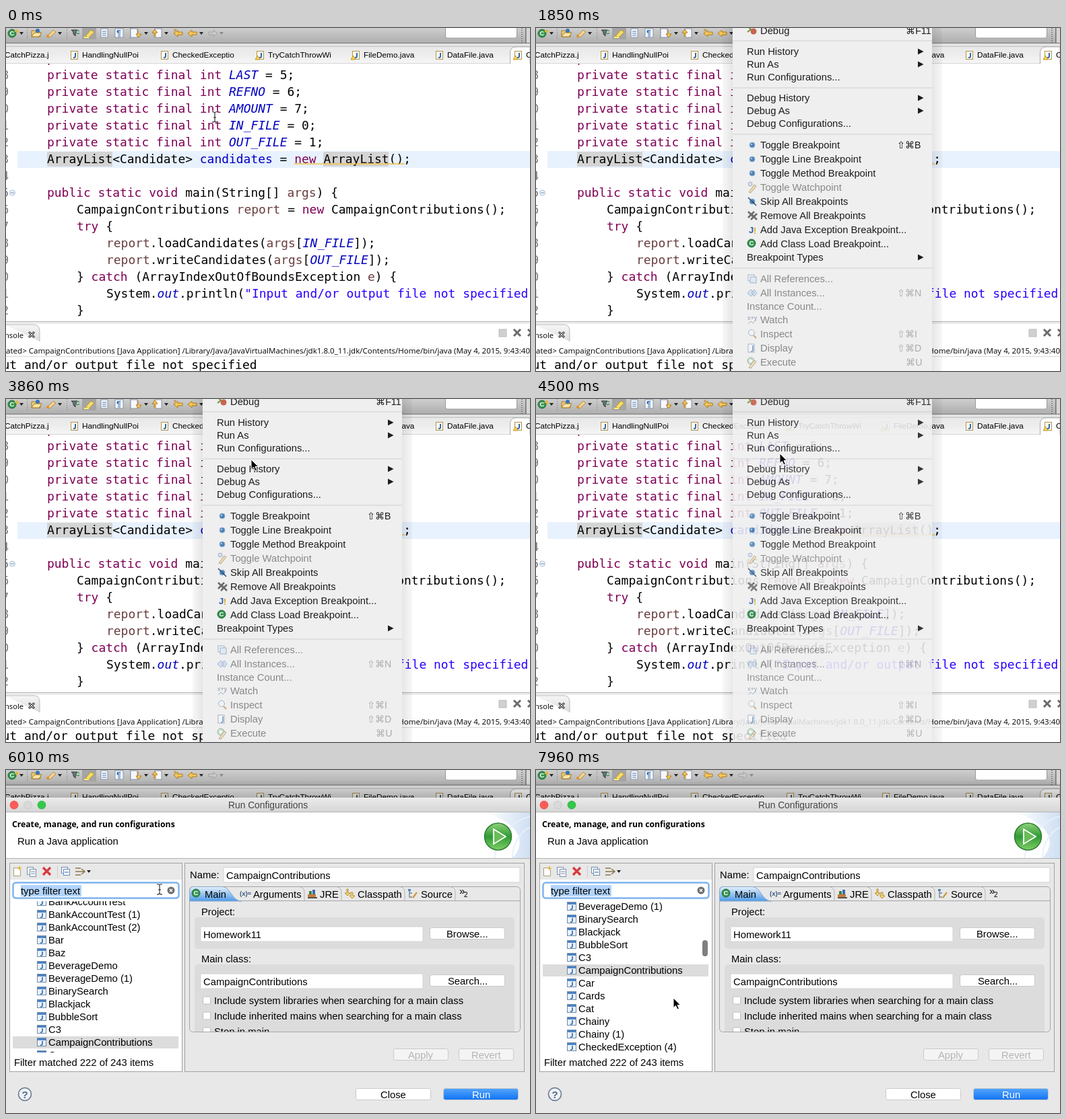
Write an HTML page that moves like this. It is 778 by 510 pixels and loops after 8 s.

```html
<!DOCTYPE html>
<html lang="en">
<head>
<meta charset="utf-8">
<title>Run configurations</title>
<style>
html, body { margin: 0; width: 100%; height: 100%; overflow: hidden; background: #fff; }
svg { display: block; width: 778px; height: 510px; font-family: "Liberation Sans", Arial, "DejaVu Sans", sans-serif; }
text { white-space: pre; }
.mono { font-family: "DejaVu Sans Mono", monospace; }
.human { font-family: "Open Sans", "Noto Sans", sans-serif; }
</style>
</head>
<body>
<svg id="stage" viewBox="0 0 778 510"></svg>
<script>
const LOOP = 8000;
const stage = document.getElementById('stage');

// Drawing helpers
const esc = s => s.replace(/&/g, '&amp;').replace(/</g, '&lt;');
const text = (x, y, s, size = 14.8, fill = '#000', extra = '') =>
  `<text x="${x}" y="${y}" font-size="${size}" fill="${fill}" ${extra}>${esc(s)}</text>`;
const rect = (x, y, w, h, fill, extra = '') =>
  `<rect x="${x}" y="${y}" width="${w}" height="${h}" fill="${fill}" ${extra}/>`;
const disc = (x, y, r, fill, extra = '') => `<circle cx="${x}" cy="${y}" r="${r}" fill="${fill}" ${extra}/>`;
const path = (d, stroke, width = 1, fill = 'none', extra = '') =>
  `<path d="${d}" stroke="${stroke}" stroke-width="${width}" fill="${fill}" ${extra}/>`;
const fillPath = (d, fill) => path(d, 'none', 0, fill);
const group = (id, body) => `<g id="${id}">${body}</g>`;
const clip = (id, x, y, w, h) => `<clipPath id="${id}">${rect(x, y, w, h, '#000')}</clipPath>`;
const gradient = (id, stops, across = false) =>
  `<linearGradient id="${id}" x2="${across ? 1 : 0}" y2="${across ? 0 : 1}">` +
  stops.map(([color, alpha = 1], i) =>
    `<stop offset="${i / (stops.length - 1)}" stop-color="${color}" stop-opacity="${alpha}"/>`).join('') +
  '</linearGradient>';
const down = (x, y, fill = '#222') => fillPath(`M${x - 3} ${y - 2}h6l-3 4z`, fill);
const greenC = (x, y, r) => disc(x, y, r, '#35934f', 'stroke="#1f6b38"') +
  text(x - r * .6, y + r * .58, 'C', r * 1.6, '#fff', 'font-weight="bold"');

const defs = '<defs>' +
  gradient('bar', [['#cecece'], ['#aeaeae']]) +
  gradient('strip', [['#e8e8e8'], ['#ededed'], ['#f6f6f6']]) +
  gradient('consoleStrip', [['#f6f6f6'], ['#dcdcdc']]) +
  gradient('title', [['#ebebeb'], ['#d5d5d5']]) +
  gradient('activeTab', [['#e4f0fc'], ['#4f9be8']]) +
  gradient('blue', [['#56a6fa'], ['#0f72f5']]) +
  gradient('orb', [['#8fd37b'], ['#2f9a35'], ['#7fd063']]) +
  gradient('sheetShade', [['#000', 0], ['#000', .26]]) +
  gradient('shadeL', [['#000', .03], ['#000', .1]], true) +
  gradient('shadeR', [['#000', .1], ['#000', .03]], true) +
  gradient('banner', [['#ffffff'], ['#cfdff3']], true) +
  clip('editor', 0, 53, 778, 383) + clip('list', 10, 195, 246, 225) + clip('form', 272, 195, 483, 194) +
  '</defs>';

// Editor window
function toolbar() {
  const arrow = (x, dir, fill = '#f3c75a', edge = '#b07c1c') =>
    path(`M${x - 7 * dir} 8l${6 * dir}-5v3h${7 * dir}v4h${-7 * dir}v3z`, edge, 1, fill);
  const page = x => rect(x - 5, 1, 10, 13, '#f7f8fc', 'stroke="#8793a8"');
  const dots = (x, height, width = 1) => path(`M${x} 0V${height}`, '#777', width, 'none', 'stroke-dasharray="1 2"');
  return rect(0, 0, 778, 22, 'url(#bar)') + rect(0, 22, 778, 1, '#777') + rect(0, 23, 778, 4, '#e3e3e3') +
    greenC(9, 8, 6) + path('M16 2v6M13 5h6', '#e1b63c', 2) +
    [23, 80, 208, 238, 290].map(x => down(x, 8)).join('') + down(320, 8, '#888') +
    [31.5, 90.5, 184.5].map(x => dots(x, 16)).join('') +
    path('M38 13V4h5l2 2h6v7z', '#a17a26', 1, '#f0cf7a') + path('M38 13l4-6h11l-4 6z', '#a17a26', 1, '#fbe6a6') + disc(47, 4, 3, '#3974b8') +
    path('M61 13l9-10 4 3-9 8z', '#b1884a', 1, '#f6d78a') + disc(62, 12, 2, '#e58d2b') +
    path('M97 3h9l-3 4v5l-3-3v-3z', '#333', 1, '#6f7684') + text(103, 9, 'C', 9, '#2c8a48', 'font-weight="bold"') +
    rect(113, 0, 21, 17, '#a5a5a5') + path('M118 12l8-9 5 3-8 8z', '#b5952c', 1, '#f7dc68') + path('M116 14h7', '#fff36b', 2) +
    page(146) + path('M143 5h6M143 8h6M143 11h6', '#4a78b8') +
    rect(162, 1, 12, 13, '#f7f8fc', 'stroke="#8793a8"') + text(164, 12, '¶', 12, '#3470b4', 'font-weight="bold"') +
    page(190) + path('M196 2v7h-3l4 5 4-5h-3', '#b07c1c', 1, '#f3c75a') +
    page(226) + path('M220 13V7h-3l4-5 4 5h-3v6', '#b07c1c', 1, '#f3c75a') +
    arrow(256, 1) + path('M249 1l4 4M253 1l-4 4', '#c08a2a') + arrow(277, 1) + arrow(307, -1, '#c9c9c9', '#a0a0a0') +
    rect(652.5, -6, 106, 21, '#fff', 'rx="3" stroke="#999"') +
    dots(766, 22, 2) + rect(771, 0, 1.5, 23, '#777') + rect(773, 0, 5, 22, '#d6d6d6');
}

function fileTabs() {
  const icon = (x, warn) => rect(x - 4.5, 34.5, 10, 12, '#fffdf2', 'stroke="#b3924e"') +
    path(`M${x + 2} 37v5q0 2-2 2h-1`, '#2f68ab', 2) +
    (warn ? path(`M${x - 7} 47l3.5-6 3.5 6z`, '#b58a12', .8, '#fbd34b') : '');
  const tabs = [[113, 'HandlingNullPoi'], [247, 'CheckedExceptio'], [389, 'TryCatchThrowWi', 1],
    [531, 'FileDemo.java', 1], [655, 'DataFile.java'], [772, 'C', 1]];
  return rect(0, 27, 778, 26, 'url(#strip)') + rect(0, 27, 778, 1, '#c2c2c2') + rect(0, 52, 750, 1, '#d5d5d5') +
    path('M748.5 53V37q0-9 9-9H778V53', '#a9a9a9', 1, '#fff') + text(-2, 44, 'CatchPizza.j', 11.8) +
    tabs.map(([x, name, warn]) => icon(x - 12, warn) + text(x, 44, name, 11.8)).join('');
}

const TOKEN = /("[^"]*"?)|\b(private|static|final|int|new|public|void|try|catch)\b|\b(FIRST|LAST|REFNO|AMOUNT|IN_FILE|OUT_FILE|out)\b|\b(candidates)\b|\b(report|args|e)\b/g;
const paint = line => esc(line).replace(TOKEN, (word, str, key, constant, field) => {
  const fill = str ? '#2a00ff' : key ? '#7f0055' : constant || field ? '#0000c0' : '#6a3e3e';
  return `<tspan fill="${fill}"${constant ? ' font-style="italic"' : ''}>${word}</tspan>`;
});
const CODE = [
  ...['FIRST = 4', 'LAST = 5', 'REFNO = 6', 'AMOUNT = 7', 'IN_FILE = 0', 'OUT_FILE = 1'].map(c => `private static final int ${c};`),
  'ArrayList<Candidate> candidates = new ArrayList();',
  '',
  'public static void main(String[] args) {',
  '\tCampaignContributions report = new CampaignContributions();',
  '\ttry {',
  '\t\treport.loadCandidates(args[IN_FILE]);',
  '\t\treport.writeCandidates(args[OUT_FILE]);',
  '\t} catch (ArrayIndexOutOfBoundsException e) {',
  '\t\tSystem.out.println("Input and/or output file not specified',
  '\t}'
];

function editor() {
  const lines = CODE.map((line, i) => {
    const code = line.replace(/^\t+/, '');
    const x = 61 + 44 * (line.length - code.length), y = 51 + 25 * i;
    return text(-6.5, y, String((i + 7) % 10), 17.94, '#808080') +
      `<text x="${x}" y="${y}" font-size="17.94">${paint(code)}</text>`;
  }).join('');
  return rect(0, 53, 778, 383, '#fff') + rect(17, 183, 761, 25, '#e8f2fe') +
    rect(61, 184, 97, 22, '#d4d4d4') + rect(471, 184, 97, 22, '#d4d4d4') +
    `<g class="mono" clip-path="url(#editor)">${lines}</g>` +
    path('M428 203' + 'l2-2l2 2'.repeat(41), '#efc04a', 1.2) +
    disc(9.5, 245, 4, '#eef4fb', 'stroke="#a9bdd8"') + path('M7 245h5', '#6f8fb5');
}

function consoleView() {
  const cross = x => path(`M${x - 5} 448l10 10M${x + 5} 448l-10 10`, '#6a6a6a', 3);
  const header = 'nated> CampaignContributions [Java Application] ' +
    '/Library/Java/JavaVirtualMachines/jdk1.8.0_11.jdk/Contents/Home/bin/java (May 4, 2015, 9:43:40';
  return rect(0, 436, 778, 74, '#fff') + rect(0, 436, 778, 1, '#b5b5b5') + rect(0, 437, 778, 3, '#ececec') +
    rect(0, 440, 778, 26, '#fff') + path('M-2 441H41q9 0 9 10V466', '#b9b9b9', 1, 'url(#consoleStrip)') +
    '<g class="human">' + text(-2, 461, 'nsole', 11.2) + text(778, 484, header, 11.55, '#000', 'text-anchor="end"') + '</g>' +
    path('M34 452l8 8M42 452l-8 8', '#333', 3) + path('M34.5 452.5l7 7M41.5 452.5l-7 7', '#fff') +
    rect(732, 448, 11, 11, '#d0d0d0', 'stroke="#bdbdbd"') + cross(759) + cross(780) +
    rect(0, 488, 778, 1, '#d8d8d8') + text(-5.5, 507, 'ut and/or output file not specified', 17.94, '#000', 'class="mono"');
}

// Run menu
const MENU = [
  [4, 'Debug', '⌘F11', 549], [35, 'Run History', '>'], [54, 'Run As', '>'], [73, 'Run Configurations...'],
  [104, 'Debug History', '>'], [123, 'Debug As', '>'], [142, 'Debug Configurations...'],
  [174, 'Toggle Breakpoint', '⇧⌘B'], [195, 'Toggle Line Breakpoint'], [216, 'Toggle Method Breakpoint'],
  [237, 'Toggle Watchpoint'], [258, 'Skip All Breakpoints'], [279, 'Remove All Breakpoints'],
  [300, 'Add Java Exception Breakpoint...'], [321, 'Add Class Load Breakpoint...'], [341, 'Breakpoint Types', '>'],
  [373, 'All References...'], [394, 'All Instances...', '⇧⌘N'], [414, 'Instance Count...'],
  [434, 'Watch'], [455, 'Inspect', '⇧⌘I'], [476, 'Display', '⇧⌘D'], [497, 'Execute', '⌘U', 549]
];
const FLAT = /History|As$|Configurations|Types|Count/;

function menuIcons() {
  const dot = y => disc(321, y, 4, '#4b80b3', 'stroke="#8fb2d4"') + disc(320, y - 1, 1.3, '#a8c8e4');
  const soft = (y, fill) => rect(315, y - 6, 9, 9, '#f4f6f9', 'stroke="#a3b1c4"') + rect(318, y - 3, 9, 9, fill, 'stroke="#a3b1c4"');
  const pen = (y, fill) => path(`M316 ${y + 6}l8-11 3 2-8 10z`, '#b3a58c', 1, fill);
  return path('M316 -1l9 9M314 6l5-4', '#70953b', 2) + disc(323, 5, 4.5, '#c8654d') +
    [174, 195, 216, 258].map(dot).join('') + path('M315 252l12 12', '#27466d', 1.4) +
    disc(318, 232, 3, '#d6dfea', 'stroke="#a3b1c4"') + pen(238, '#f1dcae') +
    path('M315 273l9 9M324 273l-9 9M319 276l9 9M328 276l-9 9', '#6c6c6c', 2.6) +
    text(316, 305, 'J', 13, '#2f5f9e', 'font-weight="bold"') + text(323, 306, '!', 12, '#d99b1c', 'font-weight="bold"') +
    greenC(320, 320, 6) + soft(373, '#dfe9f4') +
    path('M314 394l5-5 5 5-5 5zM320 394l4-5 4 5-4 5z', '#9db4cc', 1, '#d5e3f0') +
    text(314, 434, 'x+y', 9, '#8d9bb0') + path('M315 440l4-4 3 3 5-5', '#a3b1c4') +
    disc(320, 453, 4.5, '#eef3f8', 'stroke="#aab4c0"') + path('M323 457l4 4', '#c3a978', 2) +
    rect(315, 470, 9, 12, '#f4f6f9', 'stroke="#a3b1c4"') + path('M322 472v7q0 2-3 2', '#8fa9c8', 2) +
    disc(319, 495, 5, '#c5dcca', 'stroke="#9cb9a3"') + path('M317 492l5 3-5 3z', '#fff', 0, '#fff') + pen(499, '#eee0bd');
}

function menu() {
  const items = MENU.map(([y, label, key, keyX = 536], i) => {
    const off = i === 10 || i > 15;
    const ink = off ? '#888' : '#1c1c1c';
    const tail = key === '>' ? fillPath(`M567 ${y - 4.5}l8.500 4.500-8.500 4.500z`, 'currentColor')
      : key ? text(keyX, y + 5, key, 14.2, off ? '#acacac' : 'currentColor') : '';
    return `<g class="item" color="${ink}" data-base="${ink}">` +
      text(FLAT.test(label) ? 313 : 333, y + 5, label, 14.75, 'currentColor') + tail + '</g>';
  }).join('');
  return rect(277, 0, 15, 510, 'url(#shadeL)') + rect(588, 0, 15, 510, 'url(#shadeR)') + rect(292, 0, 296, 510, '#efeff0') +
    [18, 88, 157, 356].map(y => rect(292, y, 296, 2, '#dfdfdf')).join('') +
    rect(292, 64, 296, 19, '#1c7af7', 'id="highlight"') + menuIcons() + items;
}

const submenu = () => rect(583, 104, 200, 46, '#000', 'opacity=".07" rx="5"') + rect(588, 109, 200, 36, '#efeff0') +
  text(613, 132, '1 Java Application', 14.75, '#1c1c1c') + text(748, 132, '⌥⇧D', 14.2, '#1c1c1c');

// Run Configurations dialog
const CONFIGS = ['BankAccountTest', 'BankAccountTest (1)', 'BankAccountTest (2)', 'Bar', 'Baz', 'BeverageDemo', 'BeverageDemo (1)',
  'BinarySearch', 'Blackjack', 'BubbleSort', 'C3', 'CampaignContributions', 'Car', 'Cards', 'Cat', 'Chainy', 'Chainy (1)',
  'CheckedException (4)', 'CheckedException'];
const SELECTED = CONFIGS.indexOf('CampaignContributions');

const button = (x, y, w, label, labelX, fill = '#fff', ink = '#000') =>
  rect(x + .5, y + .5, w, 17, fill, 'rx="3" stroke="#c9c9c9"') + text(labelX, y + 14.5, label, 14.8, ink);
const field = (x, y, w, value) => rect(x, y, w, 22, '#fff', 'stroke="#d3d3d3"') + text(x + 4, y + 17, value);

function leftPane() {
  const rows = CONFIGS.map((name, i) => {
    const y = (i - SELECTED) * 19;
    return rect(46.5, y - 6.5, 13, 12, '#eaf2fb', 'stroke="#7189a8"') + rect(47, y - 6, 12, 3, '#4d83c4') +
      path(`M54 ${y - 2}v4q0 2-2 2h-1`, '#2f68ab', 1.6) + text(63, y + 5, name);
  }).join('');
  return rect(5.5, 138.5, 256, 310, '#fff', 'stroke="#a2a2a2"') + rect(6, 139, 255, 24, '#e8e8e8') +
    path('M11.5 145.5h7l3 3v9h-10z', '#a9a06f', 1, '#fff') + path('M20 143v6M17 146h6', '#e2b33c', 1.6) +
    rect(31.5, 144.5, 9, 11, '#f5f8fc', 'stroke="#7f93ad"') + rect(35.5, 147.5, 9, 11, '#f5f8fc', 'stroke="#7f93ad"') + path('M37 151h6M37 154h6', '#7f93ad') +
    path('M55 145l11 11M66 145l-11 11', '#d8393f', 3.2) + rect(76, 142, 1, 18, '#cfcfcf') +
    rect(82.5, 144.5, 9, 9, '#f5f8fc', 'stroke="#6d8db5"') + rect(85.5, 147.5, 9, 9, '#f5f8fc', 'stroke="#6d8db5"') + path('M87 152h6', '#2f68ab') +
    path('M103 146h8M103 151h14M103 156h8M112 147l5 4-5 4', '#8a7648', 1.5) + down(123, 151) +
    rect(10.5, 167.5, 246, 23, '#fff', 'rx="4" stroke="#7db4ef" stroke-width="2.5"') + rect(22, 171, 90, 17, '#b2d4fc') +
    text(22, 185, 'type filter text') + disc(245, 179, 5.5, '#6f6f6f') + path('M243 177l4 4M247 177l-4 4', '#fff', 1.4) +
    `<g clip-path="url(#list)">${group('rows', rect(10, -9, 246, 18, '#dcdcdc') + rows)}</g>` +
    rect(247, 248, 8, 24, '#7f7f7f', 'id="listThumb" rx="4"') + rect(12, 411, 209, 8, '#7f7f7f', 'id="wideThumb" rx="4"') +
    text(12, 440, 'Filter matched 222 of 243 items');
}

function rightPane() {
  const tabs = [[367, 'Arguments'], [466, 'JRE'], [522, 'Classpath'], [616, 'Source']];
  const check = (y, label) => rect(292.5, y - 6, 11, 11, '#fff', 'rx="2" stroke="#bfbfbf"') + text(309, y + 5, label);
  return rect(265.5, 138.5, 504, 310, '#e8e8e8', 'stroke="#a2a2a2"') + text(273, 161, 'Name:') + field(323, 145, 440, 'CampaignContributions') +
    rect(272.5, 173.5, 491, 216, '#e8e8e8', 'rx="5" stroke="#a6a6a6"') + rect(273, 194, 490, 1, '#a6a6a6') +
    path('M272.5 195V180q0-6.5 6-6.5H321c13 0 14 21.5 29 21.5z', '#8ba9c9', 1, 'url(#activeTab)') +
    [443, 498, 592, 667].map(x => path(`M${x - 6} 174q6 1 6 8V194`, '#b4b4b4')).join('') +
    greenC(282, 183, 6) + text(295, 190, 'Main') + tabs.map(([x, s]) => text(x, 190, s)).join('') +
    text(347, 187, '(x)=', 9.5, '#3c5a80', 'font-weight="bold"') +
    rect(448, 185, 12, 4, '#c97b35') + rect(450, 180, 4, 5, '#3f7d4f') + rect(455, 178, 4, 7, '#3d6ca8') + rect(448, 189, 14, 2, '#555') +
    path('M506 177v6h-3l4 4 4-4h-3v-6zM512 182v5h-2l4 4 4-4h-3v-5z', '#b58a2a', 1, '#f5d883') +
    path('M599 178v11h4M599 183h4', '#6b7f99', 1.3) + rect(597, 177, 4, 3, '#4d83c4') + path('M604 190l6-8', '#d09a3c', 2.4) +
    text(673, 185, '»', 15) + text(680, 189, '2', 10) +
    '<g clip-path="url(#form)">' + text(290, 216, 'Project:') + rect(280, 219, 475, 47, '#dcdcdc', 'rx="5"') + field(289, 233, 330, 'Homework11') +
    button(629, 234, 111, 'Browse...', 654) + text(290, 286, 'Main class:') + rect(280, 289, 475, 110, '#dcdcdc', 'rx="5"') +
    field(289, 303, 330, 'CampaignContributions') + button(629, 304, 111, 'Search...', 656) +
    check(343, 'Include system libraries when searching for a main class') +
    check(366, 'Include inherited mains when searching for a main class') + check(389, 'Stop in main') + '</g>' +
    rect(754, 198, 8, 167, '#767676', 'id="formThumb" rx="4"') +
    button(575, 414, 81, 'Apply', 597, '#f4f4f4', '#b3b3b3') + button(672, 414, 81, 'Revert', 691, '#f4f4f4', '#b3b3b3');
}

function dialog() {
  const light = (x, fill, edge) => disc(x, 52, 6, fill, `stroke="${edge}" stroke-width=".7"`);
  return rect(0, 16, 778, 25, 'url(#sheetShade)') + rect(0, 41, 778, 469, '#e8e8e8') + rect(0, 41, 778, 22, 'url(#title)') + rect(0, 62, 778, 1, '#b4b4b4') +
    light(12, '#fc5b57', '#e0443e') + light(32.5, '#d9d9d9', '#c3c3c3') + light(53, '#34c84a', '#25a939') +
    text(330, 57, 'Run Configurations', 13.8, '#454545') +
    rect(0, 63, 778, 68, '#fff') + rect(0, 131, 778, 1, '#b0b0b0') +
    fillPath('M712 63H778V131H752C775 105 760 80 712 63z', 'url(#banner)') + path('M725 131c5-30 25-55 53-62M752 131c0-20 10-38 26-46', '#e7f0fa', 2) +
    disc(730.5, 99, 20, 'url(#orb)', 'stroke="#2f7d36" stroke-width="1.5"') + path('M724 88l18 11-18 11z', '#fff', 1.8, '#69bb58') +
    text(9, 85, 'Create, manage, and run configurations', 12.2, '#000', 'class="human" font-weight="bold"') + text(17, 111, 'Run a Java application') +
    leftPane() + rightPane() +
    disc(28, 482, 9.5, '#eef1f5', 'stroke="#66788f" stroke-width="1.6"') + text(23.5, 487.5, '?', 15, '#50678a', 'font-weight="bold"') +
    button(519, 473, 111, 'Close', 556) + button(649, 473, 111, 'Run', 692, 'url(#blue)', '#fff');
}

const arrowCursor = path('M0 0V14.5L3.4 11.4L6 17L8.4 16L6 10.5H10.5z', '#fff', 1, '#000');
const BEAM = 'M-4-7.5q4 0 4 2.5V6q0 2-4 2M4-7.5q-4 0-4 2.5M0 6q0 2 4 2M-2 1h4';
const beamCursor = path(BEAM, '#fff', 2.6) + path(BEAM, '#222', 1.1);

stage.innerHTML = defs + toolbar() + fileTabs() + editor() + consoleView() +
  group('menu', menu()) + group('submenu', submenu()) + group('sheet', rect(0, 41, 778, 469, '#fefefe')) +
  group('dialog', dialog()) + group('arrow', arrowCursor) + group('beam', beamCursor);

// Stepped timelines: each entry holds until the next one
const POINTER = [
  [0, 310, 132, 'beam'], [270, 307, 135, 'beam'], [340, 303, 137, 'beam'], [410, 301, 138, 'beam'], [1010, 301, 99, 'beam'],
  [1150, 299, 88, 'beam'], [1210, 293, 70, 'beam'], [1260, 282, 50, 'arrow'], [1320, 266, 34, 'arrow'],
  [1380, 248, 18, 'arrow'], [1430, 233, 5, 'arrow'], [1490, 224, -30, 'arrow'],
  [2780, 332, -6, 'arrow'], [2850, 336, 5, 'arrow'], [2910, 342, 20, 'arrow'], [2980, 348, 38, 'arrow'],
  [3150, 356, 90, 'arrow'], [3210, 363, 108, 'arrow'], [3270, 369, 119, 'arrow'], [3320, 372, 122, 'arrow'],
  [3790, 368, 108, 'arrow'], [3860, 364, 90, 'arrow'], [3940, 362, 81, 'arrow'],
  [5800, 354, 78, 'arrow'], [6010, 228, 177, 'beam'], [6540, 240, 182, 'beam'], [6600, 258, 196, 'arrow'],
  [6650, 268, 210, 'arrow'], [6710, 272, 219, 'arrow'], [6980, 204, 339, 'arrow']
];
const HIGHLIGHT = [[0, -1], [2780, 0], [2910, -1], [2980, 1], [3150, 3], [3210, 4], [3270, 5], [3790, 4], [3860, -1], [4080, 3], [4380, -1]];
const MENU_ALPHA = [[0, 0], [1850, 1], [4440, .96], [4500, .88], [4550, .45], [4640, 0]];
const SCROLL = [[0, 405], [7360, 399], [7427, 383], [7493, 364], [7560, 346], [7627, 330], [7693, 317], [7760, 307], [7960, 298]];

const at = (track, t) => track.reduce((held, step) => step[0] <= t ? step : held);
const el = id => document.getElementById(id);
const show = (id, on) => el(id).setAttribute('display', on ? 'inline' : 'none');
const between = (t, from, to) => t >= from && t < to;
const items = [...document.querySelectorAll('.item')];

function draw(t) {
  const [, x, y, kind] = at(POINTER, t);
  for (const id of ['arrow', 'beam']) show(id, id === kind);
  el(kind).setAttribute('transform', `translate(${x} ${y})`);

  const hot = at(HIGHLIGHT, t)[1];
  el('menu').setAttribute('opacity', at(MENU_ALPHA, t)[1]);
  show('highlight', hot >= 0);
  if (hot >= 0) el('highlight').setAttribute('y', MENU[hot][0] - 9);
  items.forEach((item, i) => item.setAttribute('color', i === hot ? '#fff' : item.dataset.base));
  show('submenu', between(t, 3500, 3790));

  const row = at(SCROLL, t)[1];
  show('sheet', between(t, 5600, 5710));
  show('dialog', t >= 5710);
  el('rows').setAttribute('transform', `translate(0 ${row})`);
  el('listThumb').setAttribute('y', 248 + (399 - row) / 20);
  show('listThumb', t >= 6540);
  show('wideThumb', between(t, 6980, 7627));
  show('formThumb', between(t, 6540, 7627));
}

function tick(now) {
  draw(now % LOOP);
  requestAnimationFrame(tick);
}
draw(0);
requestAnimationFrame(tick);
</script>
</body>
</html>
```
